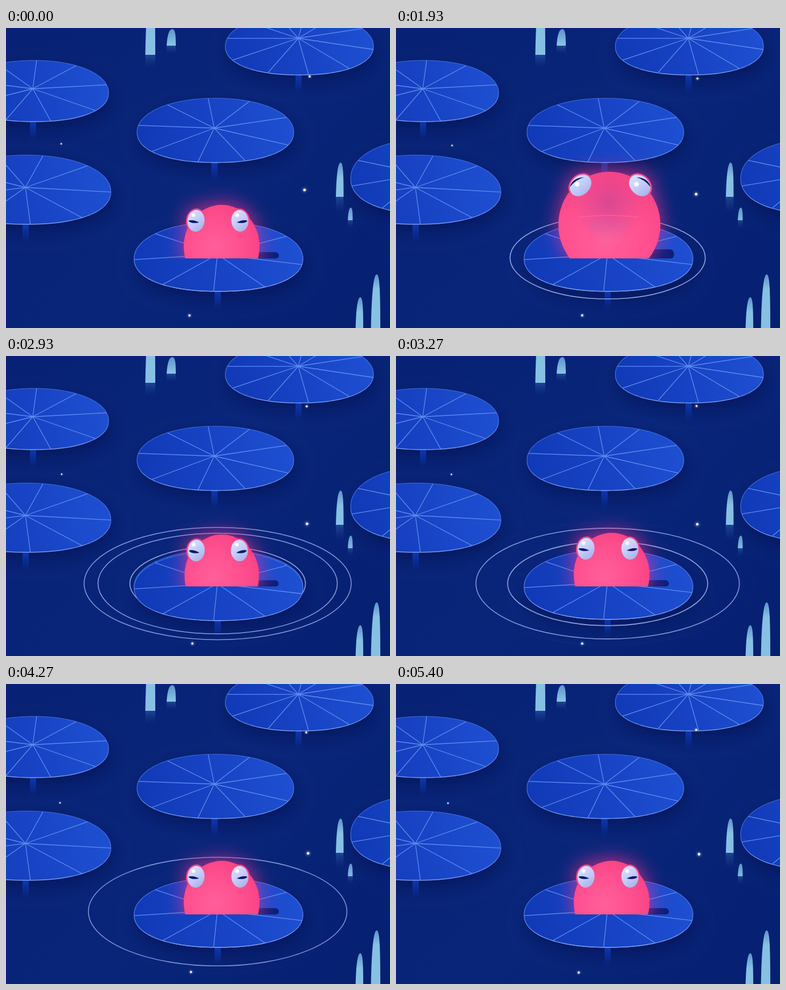
An HTML page with a canvas for the animation above (5470 ms loop, 674 px wide and 526 px high).

```html
<!DOCTYPE html>
<html lang="en">
<head>
<meta charset="utf-8">
<title>Frog pond</title>
<style>
html, body { margin: 0; width: 100%; height: 100%; overflow: hidden; background: #072274; }
canvas { display: block; }
</style>
</head>
<body>
<canvas id="stage" width="674" height="526"></canvas>
<script>
const W = 674, H = 526, LOOP = 5470, WATERLINE = 404;
const stage = document.getElementById('stage');
const pond = document.createElement('canvas');
pond.width = W;
pond.height = H;
let ctx = pond.getContext('2d');

const mix = (a, b, p) => a + (b - a) * p;
const mixAll = ([a, b], p) => a.map((v, i) => mix(v, b[i], p));
const clamp = v => Math.max(0, Math.min(1, v));
const ramp = (t, from, to) => clamp((t - from) / (to - from));
const ease = v => v * v * (3 - 2 * v);
const rad = degrees => degrees * Math.PI / 180;

function withStops(gradient, colors) {
  colors.forEach((c, i) => gradient.addColorStop(i / (colors.length - 1), c));
  return gradient;
}
const linear = (x0, y0, x1, y1, ...colors) => withStops(ctx.createLinearGradient(x0, y0, x1, y1), colors);
const radial = (x, y, r, ...colors) => withStops(ctx.createRadialGradient(x, y, 0, x, y, r), colors);

function fillDisc(x, y, r, style) {
  ctx.fillStyle = style;
  ctx.beginPath();
  ctx.arc(x, y, r, 0, 7);
  ctx.fill();
}

// turn is the angle of the first vein; lift raises the hub above the middle
function makeLeaf(cx, cy, rx, turn, { flat = .41, lift = 4, veins = 9 } = {}) {
  return { cx, cy, rx, ry: rx * flat, turn, lift, veins };
}

const leaves = [
  makeLeaf(49, 110.5, 131, -86),
  makeLeaf(36, 283.5, 148, -74),
  makeLeaf(515, 29, 130, -16.5, { lift: 11, veins: 11 }),
  makeLeaf(735, 260, 130, -38, { flat: .5 }),
  makeLeaf(367.5, 179.5, 137.5, -96)
];
const seat = makeLeaf(373, 401, 148, -27);

// An oval whose widest line sits low and whose lower half is squarer
function leafPath({ cx, cy, rx, ry }) {
  const sag = ry * .055;
  ctx.beginPath();
  for (let a = 0; a < 360; a += 2) {
    const c = Math.cos(rad(a)), s = Math.sin(rad(a));
    const power = 2 / (s > 0 ? 2.22 : 2.08);
    const bend = v => Math.sign(v) * Math.abs(v) ** power;
    ctx.lineTo(cx + rx * bend(c), cy + sag + (s > 0 ? ry - sag : ry + sag) * bend(s));
  }
  ctx.closePath();
}

function drawShade(leaf) {
  ctx.save();
  ctx.shadowColor = 'rgba(3,16,82,.62)';
  ctx.shadowBlur = 30;
  ctx.shadowOffsetX = 4;
  ctx.shadowOffsetY = 13;
  ctx.fillStyle = '#1743c4';
  leafPath(leaf);
  ctx.fill();
  ctx.restore();
}

function drawStem({ cx, cy, ry }) {
  const y = cy + ry - 3;
  ctx.fillStyle = linear(0, y, 0, y + 38, '#0e3bb4', 'rgba(11,48,160,.75)', 'rgba(8,35,135,0)');
  ctx.fillRect(cx - 7, y, 11, 38);
}

function drawLeaf(leaf) {
  const { cx, cy, rx, ry, turn, lift, veins } = leaf;
  ctx.save();
  leafPath(leaf);
  ctx.fillStyle = linear(cx - rx, cy + ry * .5, cx + rx, cy - ry * .5, '#1039b6', '#1743c4', '#1f50d2');
  ctx.fill();
  ctx.strokeStyle = linear(0, cy - ry, 0, cy + ry, 'rgba(80,122,232,.6)', 'rgba(90,132,238,.7)', '#86abf5');
  ctx.lineWidth = 1.2;
  ctx.stroke();
  ctx.clip();
  ctx.strokeStyle = '#5d8aee';
  ctx.lineWidth = 1.3;
  ctx.beginPath();
  for (let i = 0; i < veins; i++) {
    const a = rad(turn + i * 360 / veins);
    ctx.moveTo(cx - 2, cy - lift);
    ctx.lineTo(cx - 2 + rx * 1.4 * Math.cos(a), cy - lift + rx * .72 * Math.sin(a));
  }
  ctx.stroke();
  ctx.restore();
}

function drawReed(left, w, top, bottom, tail) {
  const h = bottom - top, right = left + w;
  ctx.fillStyle = linear(0, bottom, 0, bottom + tail, 'rgba(70,125,195,.38)', 'rgba(40,80,170,0)');
  ctx.fillRect(left, bottom, w, tail);
  ctx.fillStyle = linear(0, top, 0, top + 26, '#5f93cc', '#86c1e4');
  ctx.beginPath();
  ctx.moveTo(left, bottom);
  ctx.bezierCurveTo(left + w * .06, top + h * .4, left + w * .25, top, left + w * .62, top);
  ctx.bezierCurveTo(right - w * .05, top, right, top + h * .35, right, bottom);
  ctx.fill();
}

function paintPond() {
  ctx.fillStyle = linear(0, 0, W, H, '#072274', '#08257a', '#062071');
  ctx.fillRect(0, 0, W, H);
  for (const leaf of [...leaves, seat]) {
    drawShade(leaf);
    drawStem(leaf);
    drawLeaf(leaf);
  }
  drawReed(244.5, 17.5, -60, 47, 22);
  drawReed(282, 16, 2, 31, 14);
  drawReed(579, 13.5, 236, 296, 26);
  drawReed(600, 8.5, 315, 337, 14);
  drawReed(640.5, 16.5, 432, 530, 0);
  drawReed(613.5, 13.5, 472, 530, 0);
}

// Poses run from resting to puffed up.
// torso: x, y, rx, ry; eye: middle, spread, y, rx, ry, tilt
const torso = [[378.5, 383, 66.5, 73], [374.5, 345, 89.5, 93]];
const eyePose = [[372, 38.5, 338, 15, 19, .1], [376, 52, 276, 16.5, 21, .78]];
// Outer end, upper bend, inner end and lower bend, for the left eye
const slit = [[-13.5, 0, -5.5, -3, 5.5, 3, -8.5, 6], [-19, 3, -14, -14, 6, -14, -8, -11]];
const shine = [[-4.5, -10, 4], [-6, -2, 5]];

function eyeAt(side, p) {
  const [middle, spread, y, rx, ry, tilt] = mixAll(eyePose, p);
  return { x: middle + side * spread, y, rx, ry, tilt: -side * tilt };
}

function bodyPath(p) {
  const [x, y, rx, ry] = mixAll(torso, p);
  ctx.beginPath();
  ctx.ellipse(x, y, rx, ry, 0, 0, 2 * Math.PI);
  for (const side of [-1, 1]) {
    const eye = eyeAt(side, p);
    ctx.moveTo(eye.x, eye.y);
    ctx.ellipse(eye.x, eye.y, eye.rx + 2.5, eye.ry + 2.5, eye.tilt, 0, 2 * Math.PI);
  }
}

function drawEye(side, p) {
  const { x, y, rx, ry, tilt } = eyeAt(side, p);
  ctx.fillStyle = linear(x - rx, y - ry, x + rx, y + ry, '#dfe5ff', '#c3ccf8', '#a3abe6');
  ctx.beginPath();
  ctx.ellipse(x, y, rx, ry, tilt, 0, 7);
  ctx.fill();

  const s = mixAll(slit, p).map((v, i) => i % 2 ? y + v : x - side * v);
  ctx.fillStyle = '#07196a';
  ctx.beginPath();
  ctx.moveTo(s[0], s[1]);
  ctx.quadraticCurveTo(s[2], s[3], s[4], s[5]);
  ctx.quadraticCurveTo(s[6], s[7], s[0], s[1]);
  ctx.fill();

  const [dx, dy, r] = mixAll(shine, p);
  fillDisc(x + dx, y + dy, r, radial(x + dx, y + dy, r, '#fff', '#fff', 'rgba(255,255,255,.1)'));
}

function drawThroat(p) {
  ctx.globalAlpha = clamp(p);
  fillDisc(373, 308, 66, radial(373, 308, 66, 'rgba(170,60,150,.45)', 'rgba(190,60,150,.26)', 'rgba(220,60,140,0)'));
  ctx.fillStyle = linear(0, 338, 0, 380, 'rgba(200,95,165,.32)', 'rgba(240,120,170,.12)');
  ctx.beginPath();
  ctx.moveTo(333, 339);
  ctx.lineTo(413, 339);
  ctx.lineTo(389, 378);
  ctx.lineTo(359, 378);
  ctx.fill();
  ctx.strokeStyle = 'rgba(255,105,155,.75)';
  ctx.lineWidth = 1.5;
  ctx.beginPath();
  ctx.moveTo(320, 332);
  ctx.quadraticCurveTo(373, 325, 426, 332);
  ctx.stroke();
  ctx.globalAlpha = 1;
}

function drawFrog(p) {
  const right = mix(479, 488, p), top = mix(393, 388, p);
  ctx.fillStyle = '#0a1f78';
  ctx.beginPath();
  ctx.roundRect(425, top, right - 425, WATERLINE - top, [0, 8, 6, 0]);
  ctx.fill();

  ctx.save();
  ctx.beginPath();
  ctx.rect(0, 0, W, WATERLINE);
  ctx.clip();
  bodyPath(p);
  ctx.shadowColor = 'rgba(255,50,140,.75)';
  ctx.shadowBlur = 34;
  ctx.shadowOffsetY = -3;
  ctx.fillStyle = radial(365, mix(385, 375, p), mix(85, 130, p), '#ff5f9a', '#ff5290', '#f94284');
  ctx.fill();
  ctx.shadowColor = 'transparent';
  ctx.clip();
  drawThroat(p);
  ctx.restore();

  drawEye(-1, p);
  drawEye(1, p);
}

const ripples = [
  { birth: 1560, speed: 63, drag: 0 },
  { birth: 1930, speed: 62, drag: 0 },
  { birth: 2840, speed: 68, drag: 9 }
];

function drawRipple({ birth, speed, drag }, t, p) {
  const age = (t - birth) / 1000, life = 1.72;
  if (age <= 0 || age > life) return;
  const rx = seat.rx + speed * age - drag * age * age;
  ctx.globalAlpha = ramp(age, 0, .06) * ramp(age, life, life - .3) * mix(.8, .66, age / life);
  ctx.strokeStyle = '#b9c9ff';
  ctx.lineWidth = 1.6;
  ctx.beginPath();
  ctx.ellipse(371.5, 399 + 4 * clamp(p), rx, rx * .42, 0, 0, 7);
  ctx.stroke();
  ctx.globalAlpha = 1;
}

// Each light drifts by dx, dy over the loop and bows out by bx, by halfway
const sparks = [
  { r: 2, x: 533, y: 85, dx: -6, dy: -5, bx: -2, by: 6 },
  { r: 1.4, x: 97, y: 203, dx: -6, dy: 6, bx: 4, by: 1 },
  { r: 2.7, x: 524, y: 284, dx: 8, dy: 14.5, bx: 0, by: 2.5 },
  { r: 2.2, x: 322, y: 504, dx: -1.5, dy: 2, bx: 6, by: -1 }
];

function drawSpark({ r, x, y, dx, dy, bx, by }, t) {
  const u = t / LOOP, bow = Math.sin(Math.PI * u);
  const cx = x + dx * u + bx * bow, cy = y + dy * u + by * bow;
  fillDisc(cx, cy, r * 2.6,
    radial(cx, cy, r * 2.6, 'rgba(255,225,205,.55)', 'rgba(190,190,230,.2)', 'rgba(120,140,220,0)'));
  fillDisc(cx, cy, r * .85, '#fff5e6');
}

function draw(t) {
  const settle = Math.sin(Math.PI * ramp(t, 2700, 3160));
  const puff = ease(ramp(t, 1400, 1850)) - ease(ramp(t, 2450, 2850)) - .05 * settle;
  ctx.drawImage(pond, 0, 0);
  ripples.forEach(ripple => drawRipple(ripple, t, puff));
  drawLeaf({ ...seat, cy: seat.cy + 2.2 * settle });
  drawFrog(puff);
  sparks.forEach(spark => drawSpark(spark, t));
}

paintPond();
ctx = stage.getContext('2d');
const start = performance.now();

function tick() {
  draw((performance.now() - start) % LOOP);
  requestAnimationFrame(tick);
}
tick();
</script>
</body>
</html>
```
